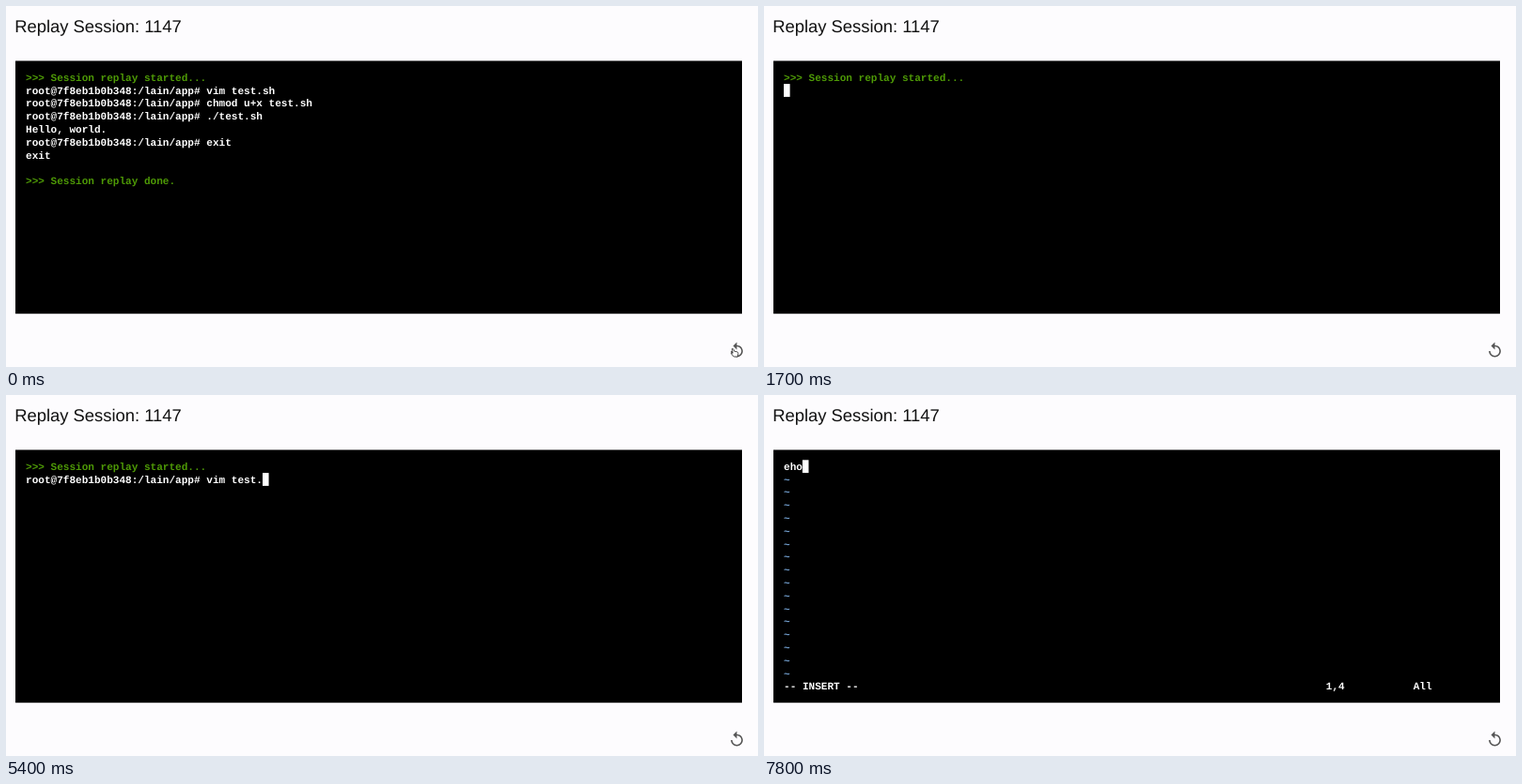
These frames come from a looping animation (800 px wide and 385 px high, 8 s). An HTML page:

```html
<!DOCTYPE html>
<html lang="en">
<head>
<meta charset="utf-8">
<title>Replay Session</title>
<style>
  html, body { margin: 0; width: 100%; height: 100%; overflow: hidden; background: #fdfcfe; }
  svg { display: block; }
  text { white-space: pre; text-rendering: geometricPrecision; }
  .title { font: 18.4px "Liberation Sans", Arial, sans-serif; fill: #111; }
  #screen text { font: bold 11.05px "Liberation Mono", "Courier New", monospace; fill: #fff; }
  #screen .green { fill: #4e9a06; }
  #screen .blue { fill: #729fcf; }
</style>
</head>
<body>
<svg width="800" height="385" viewBox="0 0 800 385">
  <text class="title" x="9.2" y="28">Replay Session: 1147</text>
  <rect x="10" y="58.5" width="773" height="269.7"/>
  <rect id="caret" width="6.6" height="13.8" fill="#fff"/>
  <g id="screen"></g>
  <circle id="ripple" cx="777" cy="366" fill="#555"/>
  <path transform="translate(767.9 357.7) scale(.8)" fill="#555"
    d="M12 5V1L7 6l5 5V7c3.31 0 6 2.69 6 6s-2.69 6-6 6-6-2.69-6-6H4c0 4.42 3.58 8 8 8s8-3.58 8-8-3.58-8-8-8z"/>
  <path id="hand" fill="#fff" stroke="#222" stroke-width=".8" stroke-linejoin="round"
    d="M772.3 365.6q.9-.7 1.5.3l1 2.3 3.2.7q1.1.4.9 1.8l-.5 3.3h-4.2l-2.7-3.2q-.3-1.2 1.7-.6z"/>
  <path id="arrow" fill="#111" stroke="#fff" stroke-width=".8" d="M0 0V7.4L1.8 5.9L3 8.6L4.2 8L3 5.4H5.2Z"/>
</svg>
<script>
const $ = id => document.getElementById(id);
const LEFT = 21, TOP = 69.3, COL = 6.63, ROW = 13.8;
const PROMPT = "root@7f8eb1b0b348:/lain/app# ";
const COMMAND = "vim test.sh";
const KEY_TIMES = [3800, 4000, 4200, 4400, 4700, 4800, 5000, 5200, 5300, 5600, 5800];
const STARTED = [0, 0, ">>> Session replay started...", "green"];

// Each screen is a list of [row, column, text, class] plus an optional caret [row, column].
function finished() {
  const lines = [
    PROMPT + COMMAND, PROMPT + "chmod u+x test.sh", PROMPT + "./test.sh",
    "Hello, world.", PROMPT + "exit", "exit"
  ];
  return {
    cells: [STARTED, ...lines.map((s, i) => [i + 1, 0, s]), [8, 0, ">>> Session replay done.", "green"]]
  };
}

function shell(t) {
  const cells = [STARTED];
  const blink = (t + 700) % 1000 < 500;
  let caret = [1, 0];
  if (t >= 1800) {
    const line = PROMPT + COMMAND.slice(0, KEY_TIMES.filter(k => k <= t).length);
    cells.push([1, 0, line]);
    caret = t < 6100 ? [1, line.length] : [2, 0];
  }
  return { cells, caret: blink && caret };
}

function editor(t) {
  const insert = t >= 7100;
  const typed = "eho".slice(0, (t >= 7400) + (t >= 7700) + (t >= 7800));
  const tildes = insert || t < 6500 ? 16 : 17;
  const cells = Array.from({ length: tildes }, (_, i) => [i + 1, 0, "~", "blue"]);
  if (t < 6500) return { cells, caret: [17, 0] };
  const position = !insert ? "0,0-1" : typed ? "1," + (typed.length + 1) : "0,1";
  cells.push([0, 0, typed], [17, 87, position], [17, 101, "All"]);
  if (insert) cells.push([17, 0, "-- INSERT --"]);
  return { cells, caret: t >= 7000 && [0, typed.length] };
}

function screenAt(t) {
  if (t < 300) return finished();
  if (t < 1400) return { cells: [] };
  return t < 6400 ? shell(t) : editor(t);
}

function drawScreen({ cells, caret }) {
  $("screen").innerHTML = cells.map(([row, col, text, cls = ""]) =>
    `<text class="${cls}" x="${LEFT + col * COL}" y="${TOP + 10.4 + row * ROW}">${text.replace(/>/g, "&gt;")}</text>`
  ).join("");
  show("caret", caret);
  if (caret) {
    $("caret").setAttribute("x", LEFT + caret[1] * COL);
    $("caret").setAttribute("y", TOP + caret[0] * ROW);
  }
}

function show(id, visible) {
  $(id).style.display = visible ? "" : "none";
}

function drawPointer(t) {
  show("hand", t < 400);
  show("arrow", t >= 400 && t < 1300);
  const across = Math.min(1, (t - 300) / 500);
  const ease = across * across * (3 - 2 * across);
  const down = Math.max(0, (t - 900) / 300);
  $("arrow").setAttribute("transform",
    `translate(${774 - 443 * ease - 6 * down} ${366 - 43 * ease + 26 * down})`);

  const p = (t - 100) / 500;
  show("ripple", p >= 0 && p < 1);
  $("ripple").setAttribute("r", Math.min(18, 8 + 30 * Math.max(0, p)));
  $("ripple").setAttribute("opacity", .3 * (1 - p));
}

let last = -1;
function tick() {
  const t = Math.floor(performance.now() % 8000 / 100) * 100;
  if (t !== last) {
    drawScreen(screenAt(t));
    drawPointer(t);
    last = t;
  }
  requestAnimationFrame(tick);
}
tick();
</script>
</body>
</html>
```
